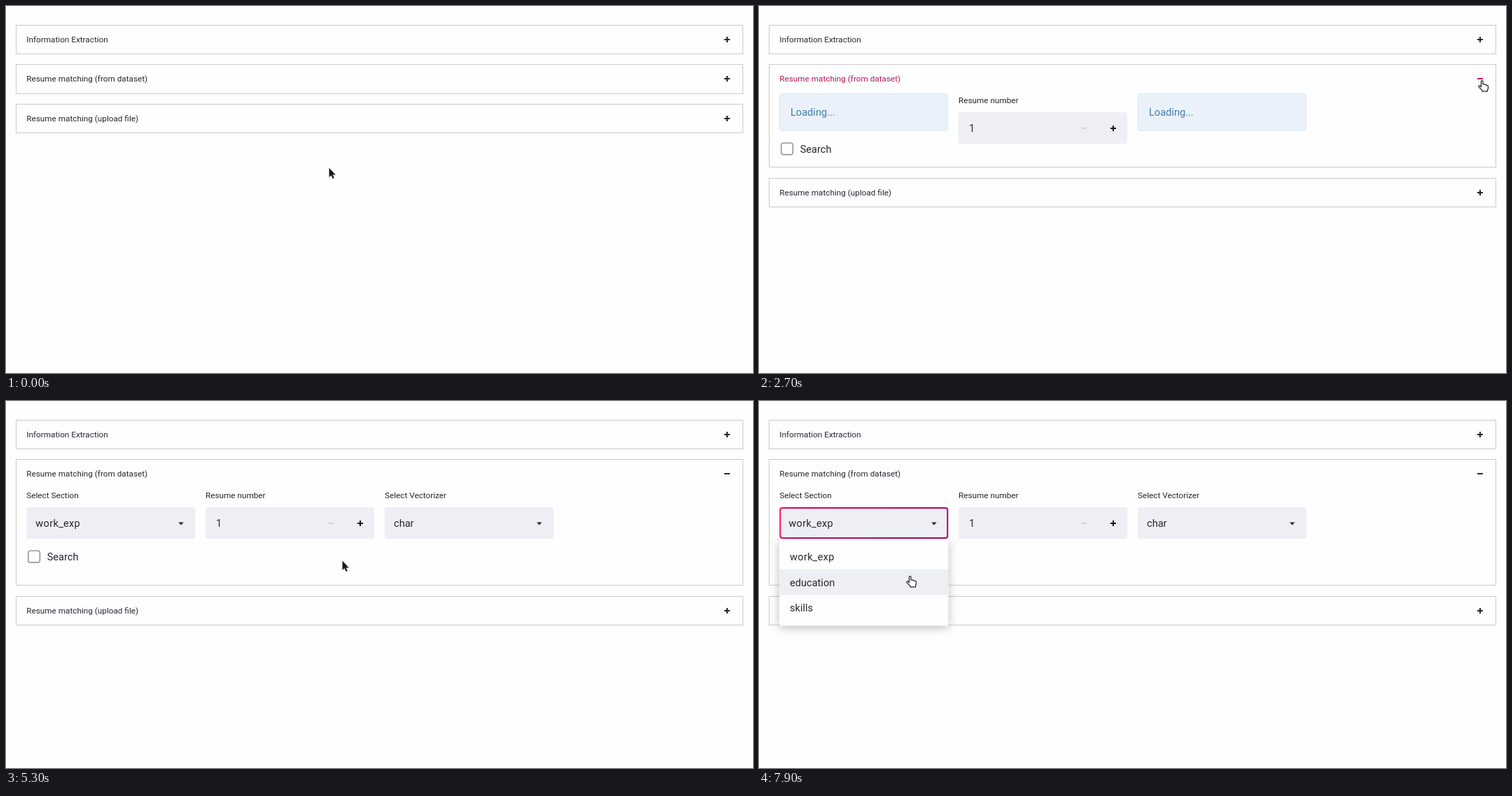
Animation of 1067x525 px, one loop 8000 ms. Source, as an HTML page with a canvas:

```html
<!DOCTYPE html>
<html lang="en">
<head>
<meta charset="utf-8">
<title>Resume matching</title>
<style>
html, body { margin: 0; width: 100%; height: 100%; overflow: hidden; background: #fefefe; }
canvas { display: block; }
</style>
</head>
<body>
<canvas id="stage" width="1067" height="525"></canvas>
<script>
const ctx = document.getElementById('stage').getContext('2d');
const LOOP = 8000, STEP = 100;
const INK = '#262730', PINK = '#b5175c', FIELD = '#eeeff5', PAGE = '#fefefe';
const SMALL = 11.75, BODY = 14.6;

const CURSORS = {
  arrow: new Path2D('M.5 .5V14L3.5 11.2L5.6 16L7.8 15L5.7 10.4H9.8Z'),
  hand: new Path2D('M4.5 1.8Q4.5 .5 5.8 .5Q7 .5 7 1.8V6L9 5.8Q9.7 6 10 6.6L11.5 6.6' +
    'Q12.1 6.9 12.4 7.4L13.5 7.6Q14.5 8 14.5 9.2V11.5Q14.5 13 13.5 14V16H6V14.5' +
    'Q3.5 12.5 .9 9.6Q.4 8.4 1.6 8Q2.8 7.8 4.5 9.8Z'),
  beam: new Path2D('M1 .5H3.2L4 1.3L4.8 .5H7M4 1.3V14.7M1 15.5H3.2L4 14.7L4.8 15.5H7')
};

// Pointer stops: time, x, y, shape
const TRACK = [
  [0, 461, 231, 'arrow'], [500, 461, 231, 'arrow'], [600, 520, 222, 'arrow'],
  [700, 640, 172, 'hand'], [900, 830, 114, 'hand'], [1000, 830, 114, 'hand'],
  [1300, 992, 108, 'hand'], [1500, 992, 108, 'hand'], [1700, 1037, 95, 'hand'],
  [2000, 1037, 95, 'hand'], [2300, 1027, 106, 'hand'], [3200, 1027, 106, 'hand'],
  [3300, 1011, 107, 'hand'], [3400, 985, 150, 'arrow'], [3800, 820, 286, 'hand'],
  [3900, 820, 286, 'hand'], [4100, 770, 250, 'arrow'], [4500, 640, 126, 'arrow'],
  [4800, 558, 168, 'hand'], [4900, 545, 180, 'hand'], [5000, 525, 200, 'arrow'],
  [5300, 480, 228, 'arrow'], [5800, 480, 228, 'arrow'], [6000, 360, 197, 'beam'],
  [6100, 303, 185, 'beam'], [6200, 303, 185, 'beam'], [6300, 275, 180, 'arrow'],
  [6400, 250, 176, 'hand'], [6500, 237, 175, 'hand'], [6600, 237, 175, 'hand'],
  [6900, 245, 179, 'hand'], [7400, 245, 179, 'hand'], [7600, 236, 211, 'hand'],
  [7800, 215, 246, 'hand'], [7900, 210, 250, 'hand']
];

const within = (t, a, b) => t >= a && t < b;

function text(str, x, y, size = SMALL, color = INK, gap = 0) {
  ctx.font = `${size}px Roboto, "Noto Sans", sans-serif`;
  ctx.letterSpacing = gap + 'px';
  ctx.fillStyle = color;
  ctx.fillText(str, x, y);
}

function rect(x, y, w, h, color) {
  ctx.fillStyle = color;
  ctx.fillRect(x, y, w, h);
}

function round(x, y, w, h, r, fill, stroke, line = 1) {
  ctx.beginPath();
  ctx.roundRect(x, y, w, h, r);
  if (fill) { ctx.fillStyle = fill; ctx.fill(); }
  if (stroke) { ctx.strokeStyle = stroke; ctx.lineWidth = line; ctx.stroke(); }
}

function sign(x, y, plus, color, size = 8) {
  rect(x - size / 2, y - 1, size, 2, color);
  if (plus) rect(x - 1, y - size / 2, 2, size, color);
}

function panel(title, top, bottom, hot, open) {
  ctx.strokeStyle = '#cbcbcd';
  ctx.lineWidth = 1;
  ctx.strokeRect(14.5, top + 0.5, 1038, bottom - top);
  const color = hot ? PINK : INK;
  text(title, 29.3, top + 24.5, SMALL, color);
  sign(1030, top + 21, !open, color);
}

function loading(x) {
  round(x + 0.5, 125.5, 240, 53, 3, '#ebf1fa', '#d9e6f2');
  text('Loading...', x + 16, 157, BODY, '#417ea8');
}

function select(x, label, value, focus) {
  text(label, x, 139);
  round(x, 152, 241, 45, 3, FIELD);
  if (focus) {
    const edge = ctx.createLinearGradient(x, 0, x + 241, 0);
    edge.addColorStop(0, '#f4145c');
    edge.addColorStop(0.06, '#c8085f');
    edge.addColorStop(1, '#ac0763');
    round(x + 1, 153, 239, 43, 3, null, edge, 2);
  }
  text(value, x + 13, 179.5, BODY, INK, value === 'work_exp' ? 0.3 : 0);
  ctx.fillStyle = INK;
  ctx.beginPath();
  ctx.moveTo(x + 217, 173.5);
  ctx.lineTo(x + 224.5, 173.5);
  ctx.lineTo(x + 220.7, 177.5);
  ctx.fill();
}

function numberField() {
  text('Resume number', 285, 139);
  round(285, 152, 241, 45, 3, FIELD);
  text('1', 300, 179.5, BODY);
  rect(460.5, 174, 7.5, 1.6, '#cfd0d4');
  sign(506, 175, true, '#15161c');
}

function checkbox(y) {
  round(31.8, y - 8.2, 16.6, 16.6, 3, PAGE, '#96979d', 1.6);
  text('Search', 58.7, y + 5.5, BODY);
}

function menu(active, alpha) {
  ctx.save();
  ctx.globalAlpha = alpha;
  ctx.shadowColor = 'rgba(0,0,0,.26)';
  ctx.shadowBlur = 14;
  ctx.shadowOffsetY = 3;
  ctx.beginPath();
  ctx.rect(0, 197, 400, 200);
  ctx.clip();
  round(29, 198, 241.5, 123.5, 3, PAGE);
  ctx.shadowColor = 'transparent';
  rect(29, 204 + active * 36.6, 241.5, 36.6, FIELD);
  ['work_exp', 'education', 'skills'].forEach((name, i) =>
    text(name, 44, 228 + i * 36.6, BODY, INK, i ? 0 : 0.3));
  ctx.restore();
}

function pointer(t) {
  let i = TRACK.length - 1;
  while (TRACK[i][0] > t) i--;
  const a = TRACK[i], b = TRACK[i + 1] || a;
  const k = b === a ? 0 : (t - a[0]) / (b[0] - a[0]);
  const path = CURSORS[a[3]];
  ctx.save();
  ctx.translate(Math.round(a[1] + (b[1] - a[1]) * k), Math.round(a[2] + (b[2] - a[2]) * k));
  ctx.lineJoin = 'round';
  if (a[3] === 'hand') {
    ctx.fillStyle = '#fff';
    ctx.fill(path);
    ctx.strokeStyle = '#24252b';
    ctx.lineWidth = 1.25;
    ctx.stroke(path);
  } else {
    ctx.strokeStyle = '#fff';
    ctx.lineWidth = 2.4;
    ctx.stroke(path);
    if (a[3] === 'arrow') {
      ctx.fillStyle = '#1c1c1f';
      ctx.fill(path);
    } else {
      ctx.strokeStyle = '#1c1c1f';
      ctx.lineWidth = 1.1;
      ctx.stroke(path);
    }
  }
  ctx.restore();
}

function draw(t) {
  const open = t >= 2700, ready = t >= 2800;
  const hot2 = within(t, 1100, 3400);
  const hot3 = within(t, 700, 900) || within(t, 3800, 4100);
  const top3 = ready ? 279 : open ? 246 : 140;

  rect(0, 0, 1067, 525, PAGE);
  panel('Information Extraction', 27, 68, false, false);
  panel('Resume matching (from dataset)', 83, ready ? 263 : open ? 230 : 125, hot2, open);
  panel('Resume matching (upload file)', top3, top3 + 41, hot3, false);

  if (open) {
    numberField();
    if (ready) {
      select(29.3, 'Select Section', 'work_exp', t >= 6900);
      select(541, 'Select Vectorizer', 'char', false);
    } else {
      loading(29);
      loading(541);
    }
    checkbox(ready ? 222.5 : 204.2);
  }
  if (within(t, 7000, 7500)) rect(108, 166, 1.2, 18, INK);
  if (t >= 7000) menu(t >= 7800 ? 1 : 0, t < 7100 ? 0.6 : 1);
  pointer(t);
}

const start = performance.now();
function tick() {
  const t = (performance.now() - start) % LOOP;
  draw(Math.floor(t / STEP) * STEP);
  requestAnimationFrame(tick);
}
tick();
</script>
</body>
</html>
```
